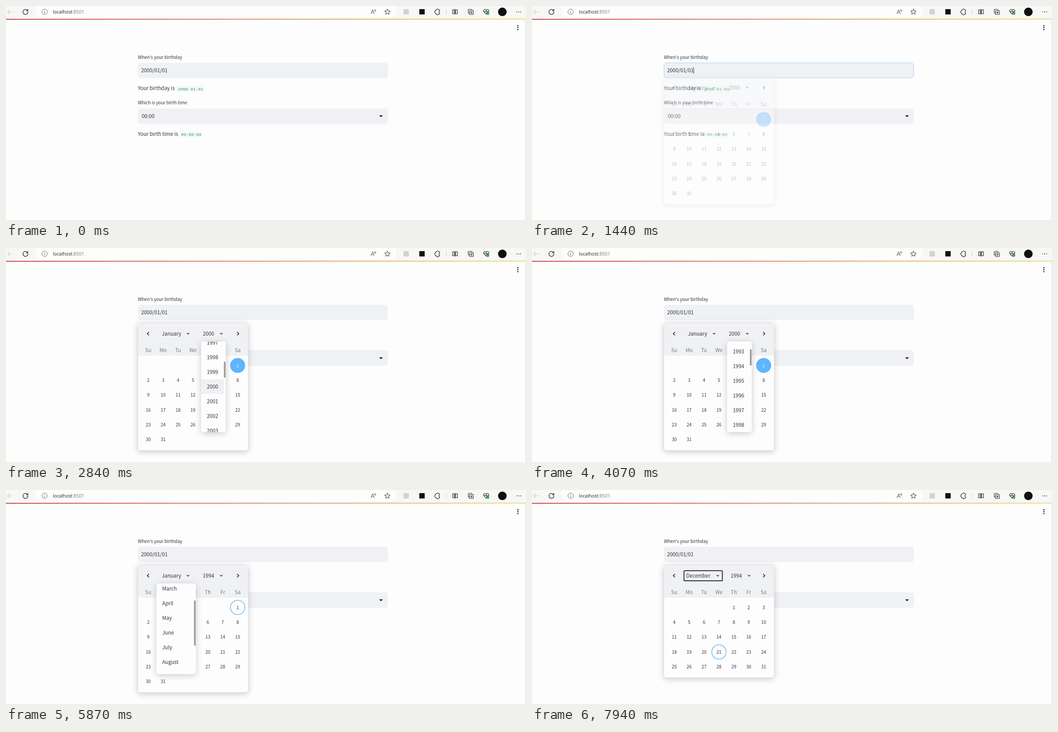
Write an HTML page that moves like this. It is 1165 px wide and 481 px high and loops after 8000 ms.

```html
<!DOCTYPE html>
<html lang="en">
<head>
<meta charset="utf-8">
<title>Birthday picker</title>
<style>
html, body { margin: 0; width: 100%; height: 100%; overflow: hidden; background: #fdfdfd; }
body > svg { display: block; width: 1165px; height: 481px; }
text { font-family: "Noto Sans CJK JP", "Noto Sans CJK SC", "Noto Sans CJK", "Noto Sans", sans-serif; white-space: pre; }
.url { font-family: "Open Sans", sans-serif; }
.code { font-family: "Liberation Mono", monospace; }
.icon { fill: none; stroke: #222; stroke-width: 1.1; stroke-linecap: round; stroke-linejoin: round; }
.pop { filter: drop-shadow(0 3px 7px #0003); }
</style>
</head>
<body>
<svg viewBox="0 0 1165 481">
  <defs>
    <linearGradient id="bar">
      <stop offset="0" stop-color="#dc4a5a"/><stop offset=".5" stop-color="#f4a06a"/><stop offset="1" stop-color="#fbea8c"/>
    </linearGradient>
  </defs>
  <g id="chrome"></g>
  <g id="page"></g>
</svg>
<script>
const LOOP = 8000, BODY = 11.4, SMALL = 10;
const INK = '#31333f', PANEL = '#f0f1f4', PAPER = '#fdfdfd', BLUE = '#60b4ff';
const MONTHS = 'January February March April May June July August September October November December'.split(' ');
const YEARS = Array.from({ length: 34 }, (_, i) => 1990 + i);
const $ = id => document.getElementById(id);

const ramp = (t, from, span) => Math.min(1, Math.max(0, (t - from) / span));
const smooth = (t, from, span) => { const p = ramp(t, from, span); return p * p * (3 - 2 * p); };

// Text is placed by the middle of its capitals.
const text = (x, y, s, size = BODY, fill = INK, more = '') =>
  `<text x="${x}" y="${y + size * .366}" font-size="${size}" fill="${fill}" ${more}>${s}</text>`;
const mid = (x, y, s, size, fill) => text(x, y, s, size, fill, 'text-anchor="middle"');
const rect = (x, y, w, h, r, fill, more = '') =>
  `<rect x="${x}" y="${y}" width="${w}" height="${h}" rx="${r}" fill="${fill}" ${more}/>`;
const dot = (x, y, r, fill, more = '') => `<circle cx="${x}" cy="${y}" r="${r}" fill="${fill}" ${more}/>`;
const icon = (d, more = '') => `<path class="icon" d="${d}" ${more}/>`;
const layer = (op, body) => `<g opacity="${op}" transform="translate(0 ${-13 * (1 - op)})">${body}</g>`;

function star(x, y) {
  let d = '';
  for (let i = 0; i < 10; i++) {
    const r = i % 2 ? 3 : 6.5, a = i * Math.PI / 5;
    d += `${i ? 'L' : 'M'}${x + r * Math.sin(a)} ${y - r * Math.cos(a)}`;
  }
  return icon(d + 'Z', 'style="stroke:#555"');
}

function chrome() {
  const grey = 'style="stroke:#666"';
  return rect(0, 0, 1165, 28, 0, '#f7f7f7') + rect(66, -6, 808, 32, 13, PAPER) +
    rect(0, 28, 1165, 1, 0, '#dfdfe2') + rect(0, 29, 1165, 2, 0, 'url(#bar)') +
    rect(1164, 31, 1, 450, 0, '#d6d6df') +
    icon('M15 13H3.5M8 8.5L3.5 13L8 17.5', 'style="stroke:#c8c8c8"') +
    icon('M48.5 10.5A5.6 5.6 0 1 0 49.2 13M49 7.5V10.8H45.6', 'style="stroke-width:1.3"') +
    dot(86.5, 13, 6, 'none', 'stroke="#666"') + icon('M86.5 12.5V16M86.5 10V10.1', grey) +
    text(105, 13, 'localhost<tspan fill="#777">:8501</tspan>', 10.4, '#222', 'class="url"') +
    icon('M817.5 17.5L821.2 8.5L825 17.5M818.8 14.5H823.6M825 8.5Q826.5 10 825 11.5M827.3 7.5Q829.6 10 827.3 12.5', grey) +
    star(854.5, 13.3) +
    rect(890.5, 7, 12, 12, 1, '#d2d2d2') + rect(926, 7, 12, 12, 0, '#111') +
    icon('M962.5 8.5H965A2 2 0 0 1 969 8.5H971.5V11.5A1.7 1.7 0 0 0 971.5 15V18H969A2 2 0 0 1 965 18H962.5V15.5A2.1 2.1 0 0 1 962.5 11Z') +
    icon('M986.5 8V18', 'style="stroke:#ccc"') +
    icon('M1004 8.5H1000.5V17.5H1004ZM1007.5 8.5H1011.5V17.5H1007.5ZM1005.8 7V19') +
    icon('M1037.5 16H1036.5Q1035.5 16 1035.5 15V9Q1035.5 7.5 1037 7.5H1043Q1044.2 7.5 1044.2 9M1038.5 10.5H1047V19H1038.5ZM1042.7 12.5V17M1040.5 14.7H1045') +
    icon('M1076 18.5L1071.2 13.5C1068 9.5 1073 5.5 1076 9.3C1079 5.5 1084 9.5 1081 13.2L1076 18.5M1070 12.5H1074L1075.5 10.5L1077 14.5L1078.5 12.5H1081') +
    dot(1079.3, 16.5, 3.3, '#2c8a3c') + icon('M1077.8 16.5L1079 17.7L1081 15.5', 'style="stroke:#fff;stroke-width:.9"') +
    dot(1112, 13.2, 9.6, '#0c0e0d') + dot(1108, 10, .6, '#57645b') + dot(1115, 12, .6, '#57645b') + dot(1110, 17, .6, '#57645b') +
    [1144.5, 1148.7, 1152.9].map(x => dot(x, 13.3, .95, '#222')).join('') +
    [44.3, 48.6, 52.9].map(y => dot(1146.8, y, 1.5, '#31333f')).join('');
}

function form(focus) {
  const code = (x, y, s) => rect(x - 3.5, y - 8, s.length * 5.7 + 7, 16, 3, '#f9fafa') +
    text(x, y + .2, s, 9.5, '#21a654', 'class="code"');
  return text(295.5, 115, "When's your birthday", SMALL) +
    rect(295.5, 127.5, 560, 34.5, 6, PANEL) +
    (focus ? rect(295.7, 127.9, 559.4, 33.8, 6, 'none', `stroke="${BLUE}" stroke-opacity="${focus}"`) +
      rect(361.8, 137.5, 1, 15, 0, INK) : '') +
    text(302.7, 145.3, '2000/01/01') +
    text(295.5, 185.2, 'Your birthday is') + code(385, 186, '2000-01-01') +
    text(295.5, 217.3, 'Which is your birth time', SMALL) +
    rect(295.5, 230, 560, 34.5, 6, PANEL) + text(304.3, 247.5, '00:00') +
    '<path d="M836 245.8H844.4L840.2 250Z" fill="#222"/>' +
    text(295.5, 287.5, 'Your birth time is') + code(392, 288.2, '00:00:00');
}

function calendar({ month, year, picked, hover, ring }) {
  const first = new Date(year, month, 1).getDay(), days = new Date(year, month + 1, 0).getDate();
  const rows = Math.ceil((first + days) / 7), height = 86.5 + 33.35 * rows;
  const long = month === 11, mx = long ? 345.5 : 349, mc = long ? 416 : 408, yx = long ? 445 : 441, yc = yx + 41.3;
  const colX = i => 318.7 + 33.38 * i;
  const down = x => icon(`M${x - 2.3} 191.5L${x} 193.8L${x + 2.3} 191.5`, 'style="stroke-width:1.3"');
  const frame = (from, to) => rect(from, 181.3, to - from, 22.9, 2, 'none', 'stroke="#111" stroke-width="1.7"');

  let out = rect(295.5, 168.5, 247, height, 6, PAPER, 'class="pop" stroke="#dcdde2" stroke-width=".8"') +
    `<path d="M296 242V174.5Q296 169 301.5 169H536.5Q542 169 542 174.5V242Z" fill="${PANEL}"/>` +
    icon('M319.8 189.3L316.5 192.5L319.8 195.7M518.4 189.3L521.7 192.5L518.4 195.7', 'style="stroke-width:1.7"') +
    text(mx, 192.8, MONTHS[month]) + down(mc) + text(yx, 192.8, year) + down(yc);
  if (ring === 'month') out += frame(mx - 5, mc + 10.5);
  if (ring === 'year') out += frame(yx - 5, yc + 10.5);
  'Su Mo Tu We Th Fr Sa'.split(' ').forEach((d, i) => out += mid(colX(i), 229.8, d, BODY, '#777a83'));
  for (let d = 1; d <= days; d++) {
    const cell = first + d - 1, x = colX(cell % 7), y = 264 + 33.35 * Math.floor(cell / 7);
    if (d === picked) out += dot(x, y, 16.8, BLUE);
    else if (d === hover) out += dot(x, y, 16.1, PAPER, 'stroke="#55aaf0" stroke-width="1.3"');
    out += mid(x, y, d, SMALL, d === picked ? '#fff' : INK);
  }
  return out;
}

function menu(x, w, items, scroll, hot) {
  const view = 204, total = items.length * 33 + 12, scale = view / total;
  const list = items.map((s, i) => {
    const y = 6 + i * 33 - scroll;
    return (i === hot ? rect(0, y, w - 4.5, 33, 0, PANEL) : '') + text(13, y + 16.5, s);
  }).join('');
  return rect(x, 210, w, view, 5, PAPER, 'class="pop"') +
    `<svg x="${x}" y="210" width="${w}" height="${view}">${list}` +
    rect(w - 4.5, scroll * scale, 4.2, view * scale, 2, '#a3a3a3') + '</svg>';
}

function scene(t) {
  const focus = t < 1640 ? ramp(t, 1320, 240) : 0;
  let out = form(focus);

  const shown = ramp(t, 1380, 200);
  if (!shown) return out;
  const yearSet = t >= 4470, monthSet = t >= 6770;
  out += layer(shown, calendar({
    month: monthSet ? 11 : 0,
    year: yearSet ? 1994 : 2000,
    picked: yearSet ? 0 : 1,
    hover: t < 7340 ? 1 : t < 7740 ? 27 : 21,
    ring: t >= 6870 ? 'month' : t >= 4570 && t < 4970 ? 'year' : ''
  }));

  const yearMenu = yearSet ? 0 : ramp(t, 2500, 200);
  if (yearMenu) {
    const scroll = 251 - 76.2 * (smooth(t, 3540, 200) + smooth(t, 3930, 130));
    out += layer(yearMenu, menu(437, 55.5, YEARS, scroll, t < 4240 ? 10 : 4));
  }
  const monthMenu = monthSet ? 0 : ramp(t, 5075, 200);
  if (monthMenu) {
    const scroll = 76.2 * (smooth(t, 5700, 150) + smooth(t, 6040, 130)) + 51.6 * smooth(t, 6170, 120);
    out += layer(monthMenu, menu(337, 88.5, MONTHS, scroll, t < 6520 ? 0 : 11));
  }
  return out;
}

$('chrome').innerHTML = chrome();
let last = '';
function tick() {
  const now = scene(performance.now() % LOOP);
  if (now !== last) $('page').innerHTML = last = now;
  requestAnimationFrame(tick);
}
tick();
</script>
</body>
</html>
```
